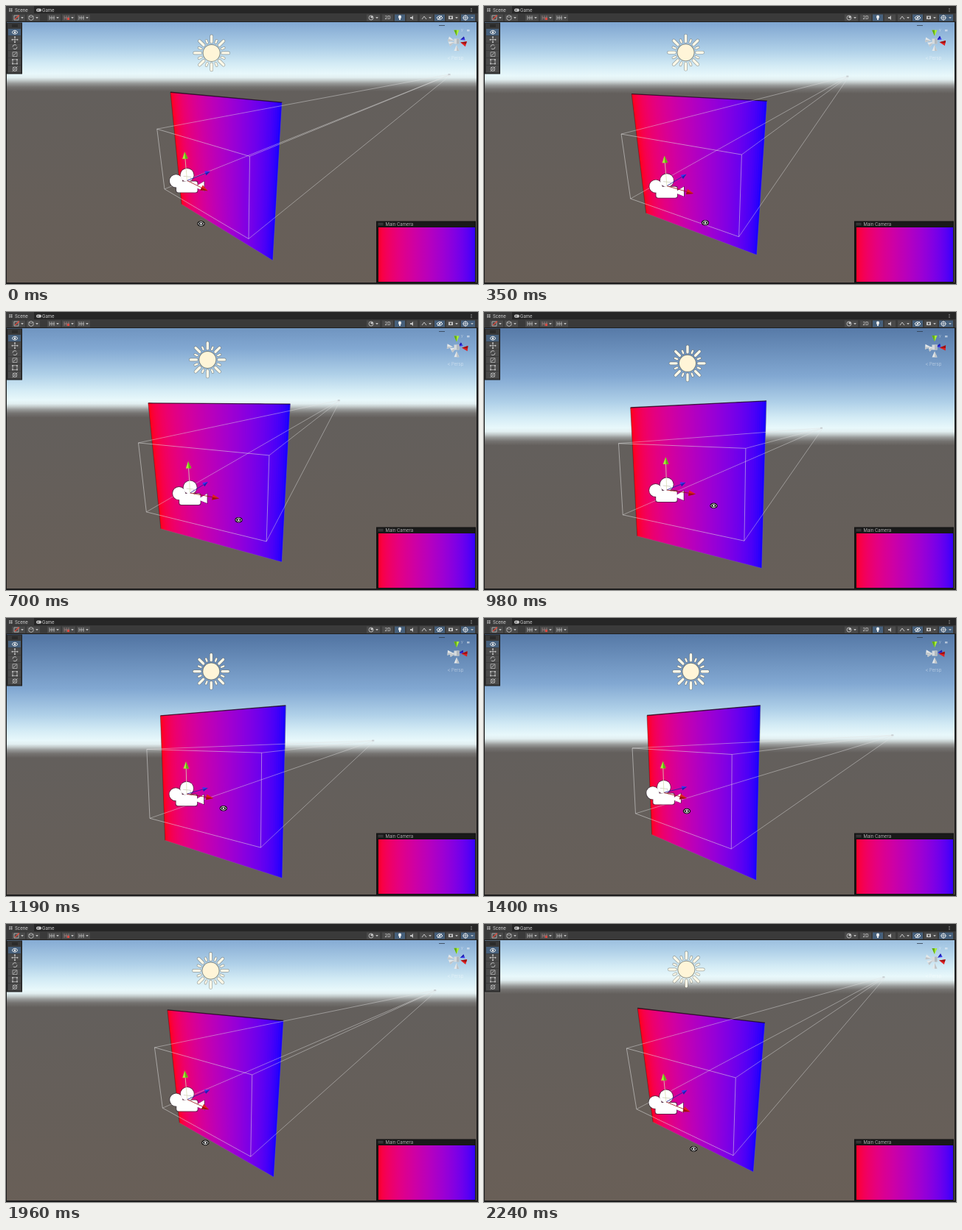
An HTML page with a canvas for the animation above (2.38 s loop, 640 by 378 pixels).

```html
<!DOCTYPE html>
<html lang="en">
<head>
<meta charset="utf-8">
<title>Scene view orbit</title>
<style>
  html, body { margin: 0; width: 100%; height: 100%; overflow: hidden; background: #1a1a1a; }
  canvas { display: block; width: 640px; height: 378px; }
</style>
</head>
<body>
<canvas id="stage" width="640" height="378"></canvas>
<script>
const g = document.getElementById('stage').getContext('2d');
const LOOP = 2380, STEP = 70, LAST = 2240;

// Pointer drag: time, x, y. The whole view follows from it.
const drag = [
  [0, 264.5, 296], [350, 300, 294.7], [700, 315.5, 282.7], [980, 311.5, 263.4],
  [1400, 275, 262.6], [1680, 257, 281], [1960, 270.3, 297.4], [2240, 284.3, 305.7]
];

// World: x right, y up, z along the game camera; the orbit pivot is the origin.
const MID = [-1.365, -1.09], PANEL_Z = -.25, NEAR_Z = -1.475, FAR_Z = 1500;
const PANEL_HALF = 3.45, NEAR_HALF = [3.05, 1.72], HANDLE = 1.17;
const CAMERA = [...MID, -2], SUN = [MID[0], 4.1, -.3];
const FOCAL = 306.6, DISTANCE = 10, CX = 319, CY = 199;

let yaw, pitch;

// Smooth curve through the drag points.
function pointerAt(t) {
  const end = drag.length - 1;
  let k = 0;
  while (k < end - 1 && t > drag[k + 1][0]) k++;
  const gap = i => drag[i + 1][0] - drag[i][0];
  const slope = (i, c) => (drag[i + 1][c] - drag[i][c]) / gap(i);
  const tangent = (i, c) => i === 0 ? slope(0, c) : i === end ? slope(end - 1, c)
    : (gap(i) * slope(i - 1, c) + gap(i - 1) * slope(i, c)) / (gap(i - 1) + gap(i));
  const h = gap(k), p = (t - drag[k][0]) / h, q = 1 - p;
  return [1, 2].map(c => drag[k][c] * (1 + 2 * p) * q * q + drag[k + 1][c] * p * p * (3 - 2 * p)
    + h * p * q * (q * tangent(k, c) - p * tangent(k + 1, c)));
}

function aimView([x, y]) {
  const rad = Math.PI / 180;
  yaw = (41.4 - .361 * (x - 264.5)) * rad;
  pitch = (19.2 + .353 * (y - 296)) * rad;
}

// World axes to view axes: right, up, depth.
function turn([x, y, z]) {
  const ahead = z * Math.cos(yaw) - x * Math.sin(yaw);
  return [
    x * Math.cos(yaw) + z * Math.sin(yaw),
    y * Math.cos(pitch) + ahead * Math.sin(pitch),
    ahead * Math.cos(pitch) - y * Math.sin(pitch)
  ];
}
function project(p) {
  const [r, u, d] = turn(p), k = FOCAL / (d + DISTANCE);
  return [CX + r * k, CY - u * k];
}
const corners = (hx, hy, z) => [[-1, 1], [1, 1], [1, -1], [-1, -1]]
  .map(([sx, sy]) => project([MID[0] + sx * hx, MID[1] + sy * hy, z]));

function path(pts, close) {
  g.beginPath();
  pts.forEach(p => g.lineTo(p[0], p[1]));
  if (close) g.closePath();
}
function fill(pts, color) { path(pts, true); g.fillStyle = color; g.fill(); }
function line(pts, color, width = 1, close = false) {
  path(pts, close);
  g.strokeStyle = color; g.lineWidth = width; g.stroke();
}
function rect(x, y, w, h, color) { g.fillStyle = color; g.fillRect(x, y, w, h); }
function oval(x, y, rx, ry, color) {
  g.beginPath(); g.ellipse(x, y, rx, ry, 0, 0, 7); g.fillStyle = color; g.fill();
}
function ring(x, y, r, color, width = 1) {
  g.beginPath(); g.arc(x, y, r, 0, 7); g.strokeStyle = color; g.lineWidth = width; g.stroke();
}
function text(s, x, y, color, size = 6) {
  g.font = size + 'px Inter, "Liberation Sans", sans-serif';
  g.fillStyle = color; g.fillText(s, x, y);
}

// Red to blue, mixed in linear light.
function hue(u) {
  const ch = v => Math.round(255 * Math.pow(Math.max(0, v), 1 / 2.2));
  return `rgb(${ch(1 - u)},0,${ch(u)})`;
}

function drawSky() {
  const y = CY - FOCAL * Math.tan(pitch);
  const stops = [
    [-140, '#5477a5'], [-70, '#82a8d2'], [-35, '#afd0e8'], [-14, '#d3ebf5'], [0, '#e8f8fb'],
    [5, '#e2eff1'], [9, '#c2caca'], [13, '#989a99'], [18, '#757371'], [24, '#635f5c'], [310, '#695f57']
  ];
  const grad = g.createLinearGradient(0, y - 140, 0, y + 310);
  stops.forEach(([d, c]) => grad.addColorStop((d + 140) / 450, c));
  rect(1, 22, 637, 354, grad);
}

function drawSun() {
  const [x, y] = project(SUN);
  const rays = (color, grow) => {
    g.lineCap = 'round';
    for (let i = 0; i < 16; i++) {
      const a = i * Math.PI / 8, c = Math.cos(a), s = Math.sin(a), end = i % 2 ? 18.5 : 23;
      line([[x + c * 15, y + s * 15], [x + c * end, y + s * end]], color, (i % 2 ? 2.2 : 3.3) + grow);
    }
    g.lineCap = 'butt';
  };
  rays('rgba(110,108,95,.55)', 1.4);
  oval(x, y, 12, 12, 'rgba(110,108,95,.7)');
  rays('#fff9e8', 0);
  oval(x, y, 11, 11, '#fff5d8');
}

function drawPanel() {
  const n = 80, span = 2 * PANEL_HALF;
  const edge = (u, side) => project([MID[0] - PANEL_HALF + span * u, MID[1] + side * PANEL_HALF, PANEL_Z]);
  for (let i = 0; i < n; i++) {
    const u = i / n, v = Math.min(1, u + 1.8 / n);
    fill([edge(u, 1), edge(v, 1), edge(v, -1), edge(u, -1)], hue(u + .5 / n));
  }
  const [tl, tr, br, bl] = corners(PANEL_HALF, PANEL_HALF, PANEL_Z);
  line([bl, tl], 'rgba(60,10,30,.45)', .9);
  line([tl, tr], 'rgba(25,5,20,.75)', 1.4);
  line([tr, br, bl], 'rgba(120,110,130,.6)', .9);
}

function drawVolume() {
  const color = 'rgba(225,225,225,.6)';
  const near = corners(...NEAR_HALF, NEAR_Z), far = corners(...NEAR_HALF, FAR_Z);
  line(near, color, .9, true);
  near.forEach((p, i) => line([p, far[i]], color, .75));
  rect(far[0][0] - 1.5, far[0][1] - 1, 3, 2, 'rgba(190,195,200,.7)');
}

function cone([x, y], angle, len, half, light, dark) {
  g.save();
  g.translate(x, y); g.rotate(angle);
  fill([[len / 2, 0], [-len / 2, -half], [-len / 2, half]], light);
  fill([[len / 2, 0], [-len / 2, 0], [-len / 2, half]], dark);
  g.restore();
}

const AXES = [
  [[0, 0, 1], '#3a3af0', '#2020a8'],
  [[1, 0, 0], '#e02020', '#9c1010'],
  [[0, 1, 0], '#a8ee38', '#62ad14']
];

function drawCamera() {
  const [x, y] = project(CAMERA);
  const shape = (grow, color) => {
    oval(x - 15, y + .5, 8.6 + grow, 8.6 + grow, color);
    oval(x, y - 7.5, 9 + grow, 9 + grow, color);
    g.beginPath();
    g.roundRect(x - 14.5 - grow, y + 1 - grow, 28.5 + 2 * grow, 15 + 2 * grow, 3);
    g.fill();
    fill([[x + 13, y + 7], [x + 23 + grow, y + 1 - grow],
      [x + 23 + grow, y + 14 + grow], [x + 13, y + 10]], color);
  };
  shape(.9, 'rgba(60,50,60,.7)');
  shape(0, '#fff');
  line([[x - 5, y - 6], [x + 5, y - 5], [x + 6, y + 3]], 'rgba(150,145,110,.5)', .7);
  for (const [axis, light, dark] of AXES) {
    const tip = project(CAMERA.map((v, i) => v + axis[i] * HANDLE));
    line([[x, y], tip], axis[1] ? '#d9ddb5' : dark, .8);
    cone(tip, Math.atan2(tip[1] - y, tip[0] - x), axis[2] ? 7 : 9.5, axis[2] ? 3 : 3.8, light, dark);
  }
}

function drawCompass() {
  const x = 611, y = 48;
  for (const [axis, light, dark] of AXES) {
    const [r, u] = turn(axis), dx = r * 12, dy = -u * 12, a = Math.atan2(dy, dx);
    const size = axis[2] ? 6 : 8;
    cone([x - dx * .8, y - dy * .8], a, 8, 3.5, '#e4e8ea', '#bfc5c9');
    cone([x + dx, y + dy], a + Math.PI, size, size * .45, light, dark);
  }
  rect(x - 3.5, y - 3.5, 7, 7, '#d5dadd');
  rect(x, y - 3.5, 3.5, 7, '#b3babf');
  text('y', 617, 34, 'rgba(255,255,255,.5)', 5);
  text('Persp', 604, 73, 'rgba(255,255,255,.45)');
  line([[602, 69.5], [599, 71], [602, 72.5]], 'rgba(255,255,255,.35)', .7);
  rect(587, 26, 8, 1, 'rgba(45,55,70,.75)');
  rect(625, 32, 3.5, 2.5, 'rgba(235,240,245,.6)');
}

function eye(x, y, color) {
  g.beginPath();
  g.moveTo(x - 4, y);
  g.quadraticCurveTo(x, y - 5, x + 4, y);
  g.quadraticCurveTo(x, y + 5, x - 4, y);
  g.strokeStyle = color; g.lineWidth = 1; g.stroke();
  oval(x, y, 1.3, 1.3, color);
}
function drawPointer([x, y]) {
  oval(x, y, 5.2, 3.8, '#0a0a0a');
  eye(x, y, '#eee');
}

const INK = '#c4c4c4', BUTTON = '#4a4a4a', ACTIVE = '#46607c';

function caret(x) { fill([[x - 1.8, 15], [x + 1.8, 15], [x, 17.2]], INK); }

function drawTabs() {
  rect(0, 0, 640, 22, '#3a3a3a');
  rect(0, 0, 640, 10, '#262626');
  rect(0, 0, 38, 10, '#3a3a3a');
  rect(0, 21, 640, 1, '#202020');
  for (const d of [0, 2.6]) {
    line([[5 + d, 3], [5 + d, 8]], INK, .7);
    line([[4, 4 + d], [9, 4 + d]], INK, .7);
  }
  text('Scene', 12, 8, '#d8d8d8');
  g.beginPath(); g.roundRect(41, 3.5, 7, 4.2, 2); g.fillStyle = INK; g.fill();
  rect(42.7, 5, 1.5, 1.2, '#262626');
  text('Game', 49, 8, '#d0d0d0');
  for (const y of [3, 5, 7]) rect(630.5, y, 1, 1, INK);
}

function drawLeftBar() {
  for (const x of [8, 28, 56, 76, 96]) {
    rect(x, 11.5, 18, 9, BUTTON);
    caret(x + 14);
  }
  line([[11, 13], [17, 13], [17, 19], [11, 19]], INK, .8, true);
  line([[12, 18], [18, 12.5]], '#e24a3c', 1.2);
  line([[31, 14], [34, 12.5], [37, 14], [37, 18], [34, 19.5], [31, 18]], INK, .8, true);
  line([[31, 14], [34, 15.5], [37, 14]], INK, .6);
  for (const x of [59, 79, 99]) {
    const color = x === 79 ? '#a78a88' : INK;
    for (const d of [0, 3, 6]) line([[x + d, 13], [x + d, 19]], color, .7);
    line([[x, 16], [x + 7, 16]], color, .8);
  }
  rect(83, 16, 3, 3, '#d84a42');
}

function drawRightBar() {
  // x, width, active
  for (const [x, w, on] of [[489, 18], [510, 15], [527, 14, 1], [543, 15], [561, 18], [581, 14, 1], [597, 18], [617, 19, 1]]) {
    rect(x, 11.5, w, 9, on ? ACTIVE : BUTTON);
    if (w > 17) caret(x + w - 4);
  }
  ring(495, 16, 3, INK, .9);
  oval(496, 15, 1.6, 1.6, INK);
  text('2D', 513.5, 18.2, '#dadada');
  oval(534, 15, 2, 2.4, '#f0f0f0');
  rect(533, 17, 2, 2, '#e0e0e0');
  fill([[548, 15], [550, 15], [552, 13], [552, 19], [550, 17], [548, 17]], INK);
  line([[564, 18], [567, 14], [570, 18]], INK, 1);
  eye(588, 16, '#eee');
  line([[585, 19], [591, 13]], '#eee', .8);
  rect(600, 13.5, 6, 4.5, INK);
  oval(603, 15.8, 1.2, 1.2, BUTTON);
  ring(623, 16, 3, '#eee', .8);
  line([[619, 16], [627, 16]], '#eee', .7);
  line([[623, 12], [623, 20]], '#eee', .7);
}

function drawSideTools() {
  rect(1, 22.5, 21, 70, '#202020');
  rect(2, 23.5, 19, 68, '#383838');
  for (const y of [25.5, 27.5]) rect(8, y, 8, .8, '#171717');
  for (let i = 0; i < 6; i++) rect(3, 31 + i * 10, 17, 9.2, i ? BUTTON : ACTIVE);
  eye(12, 35.7, '#eee');
  line([[8, 45.7], [16, 45.7]], INK, .8);
  line([[12, 41.8], [12, 49.6]], INK, .8);
  for (let i = 0; i < 4; i++) {
    const a = i * Math.PI / 2;
    oval(12 + 3.5 * Math.cos(a), 45.7 + 3.5 * Math.sin(a), 1, 1, INK);
    oval(i % 2 ? 9 : 15, i < 2 ? 73 : 78.5, 1, 1, INK);
  }
  g.setLineDash([7, 2.4]);
  ring(12, 55.7, 3, INK, .9);
  g.setLineDash([]);
  for (const y of [62.7, 72.8]) line([[9, y], [15, y], [15, y + 5.8], [9, y + 5.8]], INK, .7, true);
  line([[10, 67.5], [14, 63.5]], INK, 1);
  ring(12, 85.7, 2.8, INK, .8);
  line([[8.5, 89], [15.5, 82.4]], INK, .8);
  line([[9, 83], [15, 88.4]], INK, .6);
}

function drawPreview() {
  rect(502, 292.5, 135, 83.5, '#121212');
  rect(503, 293.5, 133, 7, '#191919');
  for (const y of [295, 297]) rect(504.5, y, 7, .8, '#5a5a5a');
  text('Main Camera', 514.5, 299, '#b0b0b0');
  const grad = g.createLinearGradient(505, 0, 636, 0);
  for (let i = 0; i <= 24; i++) grad.addColorStop(i / 24, hue(.02 + .95 * i / 24));
  rect(505, 301, 131, 74, grad);
}

function draw(t) {
  const pointer = pointerAt(t);
  aimView(pointer);
  rect(0, 0, 640, 378, '#1c1c1c');
  drawSky();
  drawPanel();
  drawVolume();
  drawSun();
  drawCamera();
  drawCompass();
  drawPointer(pointer);
  drawTabs();
  drawLeftBar();
  drawRightBar();
  drawSideTools();
  drawPreview();
}

const start = performance.now();
let shown = -1;
function tick() {
  const t = (performance.now() - start) % LOOP;
  const step = Math.min(LAST, Math.floor(t / STEP) * STEP);
  if (step !== shown) draw(shown = step);
  requestAnimationFrame(tick);
}
tick();
</script>
</body>
</html>
```
